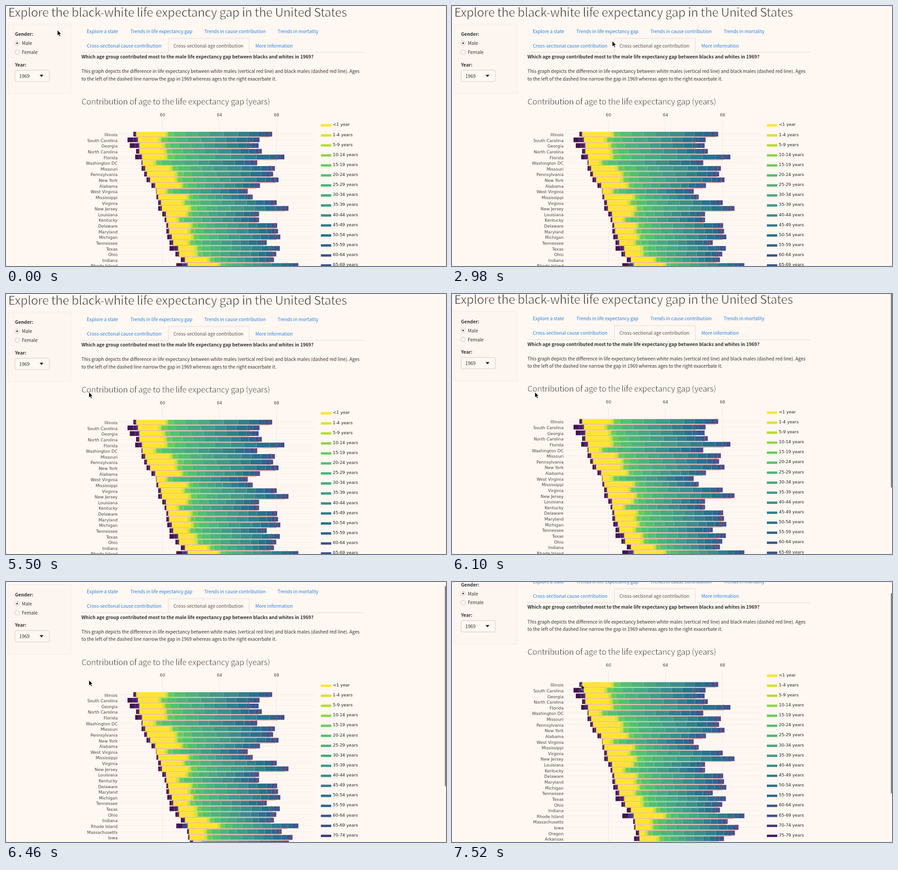
These frames come from a looping animation (974 px wide and 575 px high, 8000 ms). An HTML page:

```html
<!DOCTYPE html>
<html lang="en">
<head>
<meta charset="utf-8">
<title>Life expectancy gap</title>
<style>
html, body { margin: 0; width: 100%; height: 100%; overflow: hidden; background: #fff7f1; }
svg { display: block; }
text { font: 10.24px "Noto Sans CJK JP", "Noto Sans CJK SC", "Noto Sans CJK", sans-serif; fill: #333; }
.b { font-weight: 700; }
.link { fill: #2780e3; }
.tab { fill: #555; }
.light { fill: #333; stroke: #fff7f1; }
.h2 { font-size: 26.63px; letter-spacing: -.49px; stroke-width: .85px; }
.h3 { font-size: 17.75px; letter-spacing: -.31px; stroke-width: .6px; }
.plot { font: 9.15px "DejaVu Sans", sans-serif; fill: #444; }
.end { text-anchor: end; }
.mid { text-anchor: middle; }
.key { font-size: 9.3px; fill: #222; }
</style>
</head>
<body>
<svg id="stage" width="974" height="575" viewBox="0 0 974 575">
  <g id="page"></g>
  <rect id="thumb" x="971.5" width="2.5" height="443" rx="1" fill="#7d7a78"/>
  <path id="cursor" d="M0 0V12.2L2.8 9.6 4.7 14 6.8 13.1 4.9 8.8H8.6Z" fill="#000" stroke="#fff" stroke-width=".8"/>
</svg>
<script>
const $ = id => document.getElementById(id);
const out = [];
const text = (x, y, s, cls = '') => out.push(`<text x="${x}" y="${y}" class="${cls}">${s.replace(/</g, '&lt;')}</text>`);
const rect = (x, y, w, h, fill, more = '') => out.push(`<rect x="${x}" y="${y}" width="${w}" height="${h}" fill="${fill}" ${more}/>`);
const path = (d, stroke, more = '') => out.push(`<path d="${d}" fill="none" stroke="${stroke}" ${more}/>`);

const AGES = ['<1 year', '1-4 years'];
for (let a = 5; a < 80; a += 5) AGES.push(`${a}-${a + 4} years`);
const COLORS = ('#fde530 #dbe22c #b5dc31 #8fd645 #69cc5b #50c36c #4bb47c #44aa82 #3f9c89 ' +
  '#398f8b #2f808c #26728d #2d658d #38558b #39508a #433880 #431e6a').split(' ');
const OLDEST = '#431452';

// State, left end, black life expectancy, end of the first age group, right end
const ROWS = [
  ['Illinois', 282, 288, 351, 589], ['South Carolina', 269, 292, 336, 561],
  ['Georgia', 274, 295, 345, 559], ['North Carolina', 288, 295, 348, 566],
  ['Florida', 286, 301, 350, 616], ['Washington DC', 300, 302, 325, 556],
  ['Missouri', 300, 308, 361, 595], ['Pennsylvania', 306, 312, 372, 591],
  ['New York', 311, 319, 372, 603], ['Alabama', 322, 330, 384, 562],
  ['West Virginia', 332, 333, 350, 535], ['Mississippi', 333, 337, 398, 546],
  ['Virginia', 337, 343, 388, 599], ['New Jersey', 337, 345, 402, 625],
  ['Louisiana', 346, 354, 396, 560], ['Kentucky', 351, 355, 376, 560],
  ['Delaware', 355, 359, 405, 600], ['Maryland', 355, 361, 401, 602],
  ['Michigan', 357, 367, 408, 607], ['Tennessee', 362, 370, 400, 577],
  ['Texas', 362, 381, 416, 606], ['Ohio', 375, 383, 417, 598],
  ['Indiana', 387, 396, 444, 593], ['Rhode Island', 377, 402, 467, 647],
  ['Massachusetts', 401, 405, 437, 610], ['Iowa', 403, 406, 438, 634],
  ['Oregon', 407, 414, 426, 626], ['Arkansas', 403, 415, 452, 602]
];
const SHARES = [5, 10, 12, 13, 13, 13, 11, 10, 6, 4, 2, 1]; // ages 15-19 and up
const RED = '#e8473f';

function sidebar() {
  rect(5, 40, 139, 154, '#fdf5ef', 'stroke="#f0e7e1" stroke-width=".8"');
  text(20, 66.3, 'Gender:', 'b');
  text(35, 86.3, 'Male');
  text(35, 106.2, 'Female');
  for (const y of [82.2, 102.2])
    out.push(`<circle cx="24.6" cy="${y}" r="5" fill="#fffaf7" stroke="#aaa" stroke-width=".8"/>`);
  out.push('<circle cx="24.6" cy="82.2" r="1.9" fill="#444"/>');
  text(20, 133.8, 'Year:', 'b');
  rect(20, 142, 76, 25, '#fff7f1', 'rx="3" stroke="#ccc5c0" stroke-width=".9"');
  text(29.5, 158.6, '1969');
  out.push('<path d="M74.3 152H83L78.6 157Z" fill="#222"/>');
}

function tabs() {
  path('M167 102.5H359.5V71.5H538.5V102.5H794', '#ddd8d4', 'stroke-width=".9"');
  text(179, 59.8, 'Explore a state', 'link');
  text(275.6, 59.8, 'Trends in life expectancy gap', 'link');
  text(439, 59.8, 'Trends in cause contribution', 'link');
  text(601.3, 59.8, 'Trends in mortality', 'link');
  text(179, 91.8, 'Cross-sectional cause contribution', 'link');
  text(370.8, 91.8, 'Cross-sectional age contribution', 'tab');
  text(552, 91.8, 'More information', 'link');
}

function bar([name, left, zero, first, right], i) {
  const y = 283.4 + i * 12.63, top = y - 5.2, h = 10.4;
  path(`M251 ${y}H684`, '#f2eae5', 'stroke-width=".8"');
  text(247, y + 4.6, name, 'plot end');

  const part = (a, b, fill, edge) => {
    rect(a, top, b - a, h, fill);
    if (edge) path(`M${b} ${top}v${h}`, edge, 'stroke-width=".7"');
  };
  const neg = zero - left;
  part(left, zero - neg * .45, OLDEST);
  part(zero - neg * .45, zero - neg * .15, i == 23 ? COLORS[15] : COLORS[16], '#2c1848');
  part(zero - neg * .15, zero, i == 23 ? COLORS[14] : COLORS[15]);

  part(zero, first, COLORS[0]);
  let x = first;
  [4.5, 2.2, 2.3].forEach((w, k) => part(x, x += w, COLORS[k + 1]));

  const sizes = SHARES.map((s, k) => s * (1 + .12 * Math.sin(i * 2.1 + k * 1.7)));
  const scale = (right - x) / sizes.reduce((a, b) => a + b);
  sizes.forEach((s, k) =>
    part(x, x += s * scale, COLORS[k + 4], k < 8 ? 'rgba(190,225,205,.45)' : 'rgba(110,110,170,.7)'));

  // The net sum of all parts ends at the white life expectancy.
  const white = right - neg;
  path(`M${zero} ${y + 6.2}H${white}`, RED, 'stroke-width=".7"');
  path(`M${white} ${y - 6.2}v12.4`, RED, 'stroke-width=".9"');
  path(`M${zero} ${y - 6.2}v12.4`, RED, 'stroke-width=".8" stroke-dasharray="2 1.5"');
}

function chart() {
  text(167, 218, 'Contribution of age to the life expectancy gap (years)', 'light h3');
  [60, 64, 68].forEach((v, i) => {
    const x = 346.4 + i * 126.2;
    text(x, 243.8, String(v), 'plot mid');
    path(`M${x} 255V640`, '#eee7e3', 'stroke-width=".9"');
  });
  ROWS.forEach(bar);
  AGES.forEach((s, i) => {
    const y = 264 + i * 22.13;
    rect(697, y - 2.6, 23, 5.2, COLORS[i]);
    text(723.5, y + 1.4, s, 'plot key');
  });
}

text(5, 24, 'Explore the black-white life expectancy gap in the United States', 'light h2');
sidebar();
tabs();
text(167, 116.2, 'Which age group contributed most to the male life expectancy gap between blacks and whites in 1969?', 'b');
text(167, 148.3, 'This graph depicts the difference in life expectancy between white males (vertical red line) and black males (dashed red line). Ages');
text(167, 164.5, 'to the left of the dashed line narrow the gap in 1969 whereas ages to the right exacerbate it.');
chart();
$('page').innerHTML = out.join('');

const LOOP = 8000;
// First and last time of a move, then the point held at each step
const MOVES = [
  [600, 1510, [[104, 58], [72, 78], [40, 98], [46, 104], [68, 106], [92, 107], [102, 107]]],
  [1660, 2090, [[100, 120], [92, 140], [83, 155], [81, 158.5]]],
  [2540, 3580, [[112, 154], [205, 122], [298, 94], [354.8, 77.5], [396, 64], [424, 67], [440, 80], [444.5, 89.5]]],
  [3720, 4020, [[468, 92], [500, 94.5], [515.3, 95]]],
  [4610, 5500, [[500, 103], [440, 128], [350, 163], [265, 193], [212, 210], [188, 216.5], [183.5, 217]]],
  [6870, 7040, [[245, 223], [294.5, 226]]],
  [7220, 7520, [[291, 226], [287.5, 226], [286, 226.5]]]
];
const SCROLL = [[6100, 1.6], [6250, 14.5], [6460, 34.5], [6660, 49.2], [6870, 55.8], [7040, 56.7]];

function cursorAt(t) {
  let p = [113.8, 53.3];
  for (const [from, to, pts] of MOVES)
    pts.forEach((q, k) => {
      const step = Math.floor((to - from) * k / (pts.length - 1) / 10) * 10;
      if (t >= from + step) p = q;
    });
  return p;
}

function draw(t) {
  let s = 0;
  for (const [at, v] of SCROLL) if (t >= at) s = v;
  $('page').setAttribute('transform', `translate(0 ${-s})`);
  $('thumb').setAttribute('y', -16 + .72 * s);
  $('thumb').setAttribute('visibility', s ? 'visible' : 'hidden');
  $('cursor').setAttribute('transform', `translate(${cursorAt(t)})`);
}

const start = performance.now();
function tick() {
  draw((performance.now() - start) % LOOP);
  requestAnimationFrame(tick);
}
draw(0);
requestAnimationFrame(tick);
</script>
</body>
</html>
```
